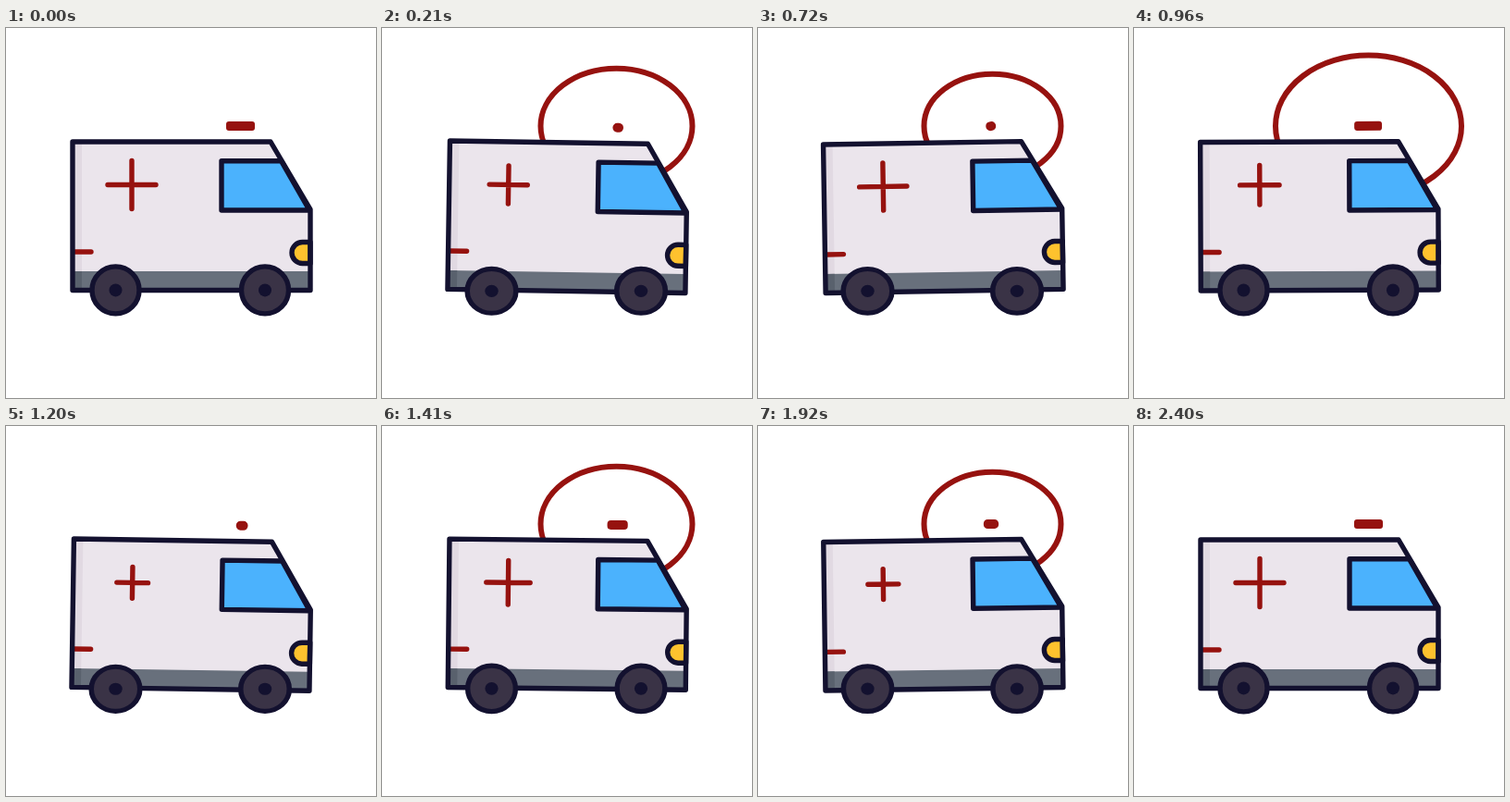
Animation, 400 px wide and 400 px high, one loop 2.46 s. Source, as an HTML page:

```html
<!DOCTYPE html>
<html lang="en">
<head>
<meta charset="utf-8">
<title>Ambulance</title>
<style>
  html, body { margin: 0; width: 100%; height: 100%; overflow: hidden; background: #fff; }
  svg { display: block; width: 100%; height: 100%; }
  .line { stroke: #13112f; stroke-width: 5.4; stroke-linejoin: round; }
  .red { fill: none; stroke: #96120f; stroke-width: 5.4; stroke-linecap: round; }
</style>
</head>
<body>
<svg viewBox="0 0 400 400">
  <defs>
    <g id="tyre">
      <circle class="line" r="25.5" fill="#3a3346"/>
      <circle r="7" fill="#13112f"/>
    </g>
  </defs>
  <ellipse id="ring" cx="253.5" cy="106" fill="none" stroke="#96120f"/>
  <g id="van">
    <rect id="siren" y="101" height="10" fill="#96120f"/>
    <path d="M72 123H286L329 196V284H72Z" fill="#ebe5ec"/>
    <path d="M72 123h10v140h-10z" fill="#e1d9e2"/>
    <path d="M72 263H329V284H72z" fill="#68707c"/>
    <path d="M72 263h10v21h-10z" fill="#59616d"/>
    <path class="red" d="M74 242H92"/>
    <path class="line" d="M329 231.5H320.5a11.5 11.5 0 0 0 0 23H329z" fill="#fec22e"/>
    <path class="line" d="M233 143.7H297.5L328 197H233z" fill="#4bb2fd"/>
    <path class="line" d="M72 123H286L329 196V283.5H72Z" fill="none"/>
    <path id="cross" class="red"/>
  </g>
  <use class="wheel" href="#tyre" data-x="118.5"/>
  <use class="wheel" href="#tyre" data-x="280"/>
</svg>
<script>
const LOOP = 2460, STEP = 30;
const SWAYS = [0, 17, 33.2, 51, 70];
const RING = [[0, 63], [4, 74], [7, 82], [12, 100.5], [14, 101], [16, 104]];
const get = id => document.getElementById(id);
const ring = get('ring'), van = get('van'), siren = get('siren'), cross = get('cross');
const wheels = document.querySelectorAll('.wheel');

// Alternating half waves: right, left, right, left, rest.
function sway(n) {
  const i = SWAYS.findIndex((start, k) => n >= start && n < SWAYS[k + 1]);
  if (i < 0) return 0;
  const p = (n - SWAYS[i]) / (SWAYS[i + 1] - SWAYS[i]);
  return Math.sin(Math.PI * p) * (i % 2 ? -1 : 1);
}

function lerpPoints(points, x) {
  const i = Math.max(1, points.findIndex(p => p[0] >= x));
  const [x0, y0] = points[i - 1], [x1, y1] = points[i];
  return y0 + (y1 - y0) * (x - x0) / (x1 - x0);
}

function drawRing(n) {
  const p = n % 20, visible = p >= 2 && p < 16;
  ring.setAttribute('visibility', visible ? 'visible' : 'hidden');
  if (!visible) return;
  const r = lerpPoints(RING, p);
  ring.setAttribute('rx', r);
  ring.setAttribute('ry', r * 0.76);
  ring.setAttribute('stroke-width', p > 13 ? 11 : 6);
}

function draw(n) {
  const tilt = sway(n), squash = tilt * tilt;
  van.setAttribute('transform', `translate(0 ${squash}) rotate(${tilt * 0.93} 200 215)`);

  const width = 31 - 21 * squash;
  siren.setAttribute('x', 253.5 - width / 2);
  siren.setAttribute('width', width);
  siren.setAttribute('rx', 3 + 2 * squash);

  const arm = 21.25 + 4.75 * Math.cos(2 * Math.PI * Math.min(n / 25.6, 3));
  cross.setAttribute('d', `M${136 - arm} 169.5h${2 * arm}M136 ${169.5 - arm}v${2 * arm}`);

  for (const w of wheels)
    w.setAttribute('transform',
      `translate(${w.dataset.x} ${283.4 + squash}) scale(${1 + 0.035 * squash} ${1 - 0.065 * squash})`);
  drawRing(n);
}

function tick() {
  draw(Math.min(80, Math.floor(performance.now() % LOOP / STEP)));
  requestAnimationFrame(tick);
}
tick();
</script>
</body>
</html>
```
